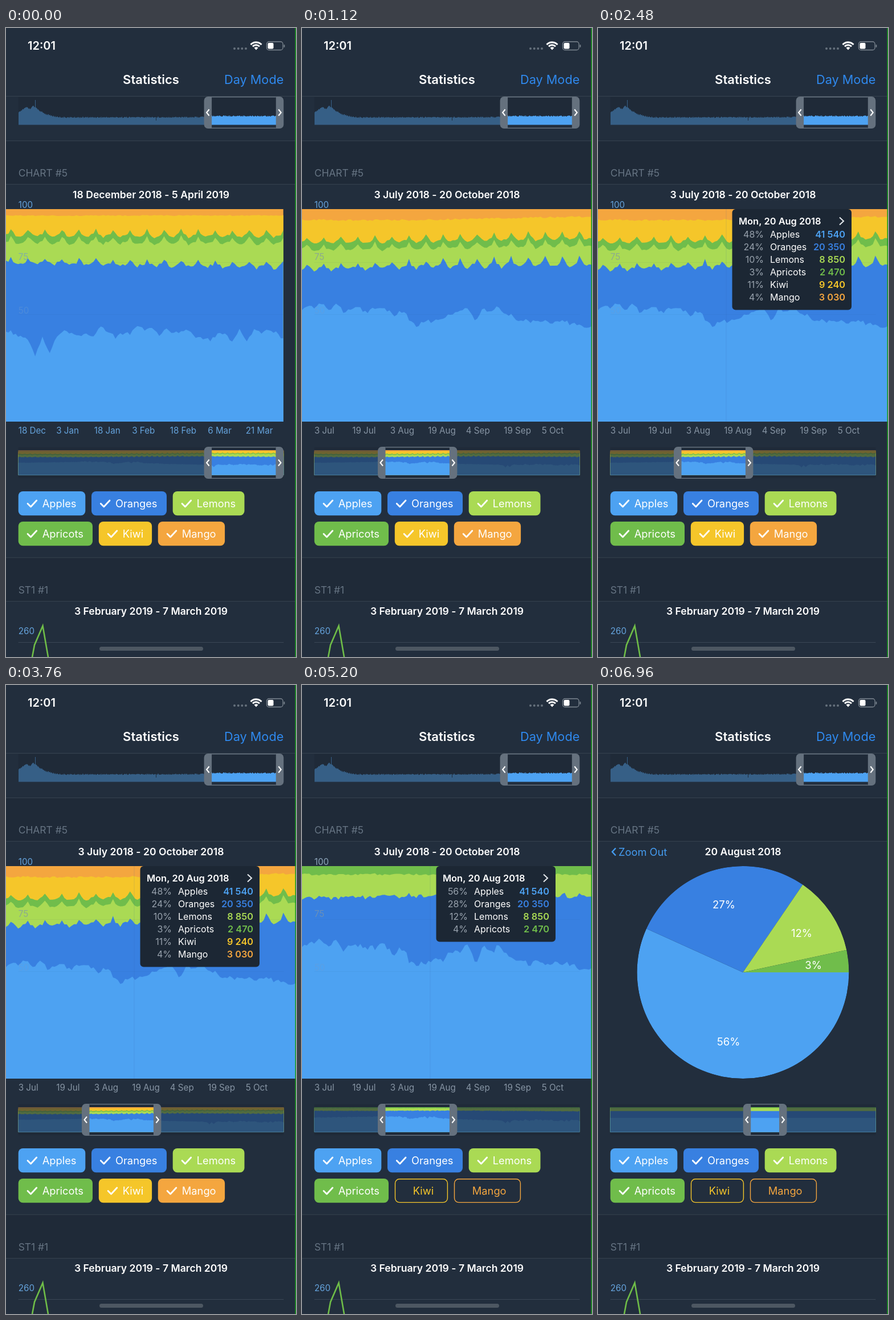
Animation, 509 px wide and 1101 px high, one loop 8000 ms. Source, as an HTML page with a canvas:

```html
<!DOCTYPE html>
<html lang="en">
<head>
<meta charset="utf-8">
<title>Statistics</title>
<style>
html, body { margin: 0; width: 100%; height: 100%; overflow: hidden; background: #222e3d; }
canvas { display: block; width: 509px; height: 1101px; }
</style>
</head>
<body>
<canvas id="stage"></canvas>
<script>
const W = 509, H = 1101, LOOP = 8000, STEP = 80;
const LEFT = 21.7, RIGHT = 487.3, TOP = 317, BOTTOM = 689, DAY_W = 4.27, LAST_DAY = 365;
const CELL = '#222e3d', SECTION = '#1f2a38', DARK = '#1c2734', RULE = '#36424f', MUTED = '#8795a4';
const LINK = '#2f89ee', AXIS = '#65a3dc';
const PIE = { x: 254.5, y: 503, r: 186 };

const series = [
  { name: 'Apples',   color: '#4da2f2', value: 41540, x: 21.7,  y: 811, w: 117.6 },
  { name: 'Oranges',  color: '#3880e1', value: 20350, x: 150,   y: 811, w: 132 },
  { name: 'Lemons',   color: '#aada54', value: 8850,  x: 292.7, y: 811, w: 125.8 },
  { name: 'Apricots', color: '#70bd4b', value: 2470,  x: 21.7,  y: 864, w: 130.3 },
  { name: 'Kiwi',     color: '#f5c62a', value: 9240,  x: 162.8, y: 864, w: 93.3 },
  { name: 'Mango',    color: '#f4a63f', value: 3030,  x: 266.8, y: 864, w: 117.3 }
];
const percents = { 6: [48, 24, 10, 3, 11, 4], 5: [50, 25, 10, 3, 12], 4: [56, 28, 12, 4] };
const pieLabels = [['56%', 229, 624], ['27%', 221, 384], ['12%', 357.5, 434], ['3%', 378, 490]];

const canvas = document.getElementById('stage');
const c = canvas.getContext('2d');
const dpr = window.devicePixelRatio || 1;
canvas.width = Math.round(W * dpr);
canvas.height = Math.round(H * dpr);

const lerp = (a, b, p) => a + (b - a) * p;
const clamp = (v, a, b) => Math.min(b, Math.max(a, v));
const smooth = p => p * p * (3 - 2 * p);
const noise = n => { const v = Math.sin(n * 12.9898) * 43758.5453; return v - Math.floor(v) - 0.5; };

function track(points, d) {
  const i = clamp(points.findIndex(p => p[0] >= d), 1, points.length - 1);
  const [a, b] = [points[i - 1], points[i]];
  return lerp(a[1], b[1], clamp((d - a[0]) / (b[0] - a[0]), 0, 1));
}

// Daily shares, built from layer tops measured on the full chart
const summer = [495, 486, 488, 482, 494, 484, 498, 492, 487, 500, 492, 490, 493, 503, 495, 512, 523, 513, 514, 511,
  502, 498, 494, 494, 512, 490, 497, 488, 500, 505, 512, 512, 513, 513, 518, 513, 514, 517, 518, 525, 523];
const winter = [533, 533, 540, 545, 571, 544, 568, 540, 529, 534, 541, 536, 541, 521, 531, 540, 534, 534, 520, 528,
  524, 538, 529, 531, 532, 528, 540, 543, 545, 534, 533, 549, 529, 547, 528, 532, 530, 531, 546];
const appleTops = [[0, 505], ...summer.map((y, i) => [83.6 + 3 * i, y]), ...winter.map((y, i) => [251 + 3 * i, y])];
const orangeTops = [[0, 424], [84, 424], [203, 416], [251, 413], [365, 421]];
const apricotTops = [[0, 378], [84, 378], [203, 371], [251, 365], [365, 367]];
const kiwiTops = [[0, 337], [84, 336], [130, 336], [203, 330], [251, 328.5], [365, 328]];
const week = [1, 0.5, 0.2, 0, 0.12, 0.25, 0.45];

function makeDay(d) {
  const winterDay = d > 230;
  const beat = week[((d - 163 + (winterDay ? 1 : 0)) % 7 + 7) % 7];
  const grow = clamp((d - 84) / 90, 0, 1);
  const apples = track(appleTops, d) + (d % 3 ? noise(d) * 8 : 0);
  const oranges = track(orangeTops, d) - beat * (winterDay ? 12 : lerp(11, 17, grow)) + noise(d + 400) * 6;
  const apricots = track(apricotTops, d) - beat * (winterDay ? 13 : lerp(10, 15, grow)) + noise(d + 800) * 4;
  const lemons = apricots + 12.5 + noise(d + 1200) * 3;
  const kiwi = track(kiwiTops, d) + noise(d + 1600) * (winterDay ? 1.6 : 3);
  const edges = [BOTTOM, apples, oranges, lemons, apricots, kiwi, TOP];
  return series.map((s, i) => (edges[i] - edges[i + 1]) / (BOTTOM - TOP));
}
const days = Array.from({ length: LAST_DAY + 1 }, (_, d) => makeDay(d));
const pieTotal = series.slice(0, 4).reduce((sum, s) => sum + s.value, 0);
const pieShares = series.map((s, i) => i < 4 ? s.value / pieTotal : 0);

// Progress of a change in 80 ms steps; "lead" is what the first step already shows
function change(t, start, lead) {
  if (t < start) return 0;
  const k = Math.min(3, Math.floor((t - start) / STEP));
  return lerp(lead, 1, k / 3);
}

function text(str, x, y, size, color, weight = 400, align = 'left') {
  c.font = `${weight} ${size}px Inter, Roboto, sans-serif`;
  c.fillStyle = color;
  c.textAlign = align;
  c.fillText(str, x, y);
}
function box(x, y, w, h, color) { c.fillStyle = color; c.fillRect(x, y, w, h); }
function roundPath(x, y, w, h, r) { c.beginPath(); c.roundRect(x, y, w, h, r); }
function roundBox(x, y, w, h, r, color) { roundPath(x, y, w, h, r); c.fillStyle = color; c.fill(); }
function line(points, color, width) {
  c.beginPath();
  points.forEach(p => c.lineTo(p[0], p[1]));
  c.strokeStyle = color;
  c.lineWidth = width;
  c.stroke();
}
function chevron(x, y, w, h, color, width) {
  line([[x, y - h / 2], [x + w, y], [x, y + h / 2]], color, width);
}
function fade(alpha, draw) {
  if (alpha <= 0) return;
  c.save();
  c.globalAlpha *= alpha;
  draw();
  c.restore();
}

function stack(rows, weights, xOf, top, height) {
  const sums = rows.map(r => r.reduce((sum, v, i) => sum + v * weights[i], 0));
  for (let layer = series.length - 1; layer >= 0; layer--) {
    if (!weights[layer]) continue;
    c.beginPath();
    c.moveTo(xOf(0), top + height);
    rows.forEach((row, d) => {
      let v = 0;
      for (let i = 0; i <= layer; i++) v += row[i] * weights[i];
      c.lineTo(xOf(d), top + height * (1 - v / sums[d]));
    });
    c.lineTo(xOf(rows.length - 1), top + height);
    c.fillStyle = series[layer].color;
    c.fill();
  }
}

function dateParts(d) {
  const date = new Date(Date.UTC(2018, 3, 5 + d));
  const month = ['January', 'February', 'March', 'April', 'May', 'June', 'July', 'August',
    'September', 'October', 'November', 'December'][date.getUTCMonth()];
  return [date.getUTCDate(), month, date.getUTCFullYear()];
}
const longDate = d => dateParts(d).join(' ');
const shortDate = d => { const p = dateParts(d); return p[0] + ' ' + p[1].slice(0, 3); };

function selector(x0, x1, y) {
  const grip = 13.5, color = '#65717e';
  line([[x0 + grip, y + 0.7], [x1 - grip, y + 0.7]], color, 1.4);
  line([[x0 + grip, y + 55.3], [x1 - grip, y + 55.3]], color, 1.4);
  roundBox(x0, y, grip, 56, [7, 0, 0, 7], color);
  roundBox(x1 - grip, y, grip, 56, [0, 7, 7, 0], color);
  chevron(x0 + 9, y + 28, -4.5, 11, '#fff', 2);
  chevron(x1 - 9, y + 28, 4.5, 11, '#fff', 2);
}

function statusBar() {
  text('12:01', 38, 38, 20, '#fff', 600);
  [401, 407.7, 414.3, 421].forEach(x => roundBox(x - 2, 34, 4, 4, 2, '#66717d'));
  c.lineCap = 'butt';
  [[13, 3], [8.2, 3]].forEach(([r, w]) => {
    c.beginPath();
    c.arc(439, 38, r, -Math.PI * 0.76, -Math.PI * 0.24);
    c.strokeStyle = '#fff';
    c.lineWidth = w;
    c.stroke();
  });
  c.beginPath();
  c.moveTo(439, 38.5);
  c.arc(439, 38, 4.8, -Math.PI * 0.76, -Math.PI * 0.24);
  c.fillStyle = '#fff';
  c.fill();
  roundPath(457.5, 24, 28.5, 14.5, 4);
  c.strokeStyle = '#7d8791';
  c.lineWidth = 1.3;
  c.stroke();
  roundBox(459.5, 26, 10, 10.5, 2, '#fff');
  roundBox(487.5, 29, 1.8, 5, 1, '#7d8791');
}

function upperNav() {
  box(LEFT, 121, RIGHT - LEFT, 48, SECTION);
  const shape = [[22, 148], [30, 142], [36, 138.5], [42, 142], [46, 136], [50, 139], [54, 141], [60, 146],
    [70, 151], [85, 155], [100, 156.5], [340, 156], [361, 154], [487, 154]];
  for (let x = 22; x < 487; x++) {
    const y = x === 51 ? 126 : x === 263 ? 162 : track(shape, x) + noise(x + 50) * 2;
    box(x, y, 1.05, 169.5 - y, x < 355 ? '#365f86' : series[0].color);
  }
  selector(347.6, RIGHT, 120);
}

function page() {
  box(0, 0, W, H, CELL);
  box(0, 198, W, 76, SECTION);
  box(0, 927, W, 77, SECTION);
  [119, 197, 273, 926.5, 1003].forEach(y => box(0, y, W, 1, RULE));
  statusBar();
  text('Statistics', 254.5, 97.5, 22, '#fff', 600, 'center');
  text('Day Mode', RIGHT, 97.5, 21.7, LINK, 400, 'right');
  upperNav();
  text('CHART #5', LEFT, 260, 17.4, '#667483');
  text('ST1 #1', LEFT, 990, 17.4, '#667483');
  text('3 February 2019 - 7 March 2019', 254.5, 1027, 17.6, '#fff', 600, 'center');
  text('260', LEFT, 1061, 15.2, AXIS);
  box(LEFT, 1075, RIGHT - LEFT, 1, '#3b4756');
  line([[45.5, 1104], [50, 1080], [64.5, 1046.5], [74.5, 1104]], '#6fbd48', 2.6);
  roundBox(164, 1083, 182, 7, 3.5, '#4d5762');
}

function pieWedges(radius) {
  let from = 0;
  pieShares.slice(0, 4).forEach((share, i) => {
    const to = from + share * Math.PI * 2;
    c.beginPath();
    c.moveTo(PIE.x, PIE.y);
    c.arc(PIE.x, PIE.y, radius, from, to);
    c.fillStyle = series[i].color;
    c.fill();
    from = to;
  });
}

function chart(s) {
  const xOf = d => LEFT + (d - s.start) * DAY_W;
  const flat = 1 - s.pie;
  c.save();
  roundPath(lerp(0, PIE.x - PIE.r, s.pie), TOP, lerp(W, PIE.r * 2, s.pie), BOTTOM - TOP, PIE.r * s.pie);
  c.clip();
  fade(flat, () => stack(days, s.weights, xOf, TOP, BOTTOM - TOP));
  fade(s.pie, () => pieWedges(s.pie < 1 ? 420 : PIE.r));
  c.restore();

  fade(flat, () => {
    [410, 501].forEach(y => box(LEFT, y, RIGHT - LEFT, 1, 'rgba(35,60,100,.06)'));
    text('100', LEFT, 314.5, 15.2, s.weights[5] ? AXIS : '#8fa6bb');
    fade(0.7, () => text('75', LEFT, 406, 15.2, s.pan < 1 ? '#6f9fc4' : '#7f96a8'));
    fade(0.4, () => text('50', LEFT, 500, 15.2, '#6d9bd0'));
    for (let i = 0; i < 7; i++) {
      const d = Math.round(s.labelStart + i * 15.58);
      text(shortDate(d), LEFT + i * 66.5, 710, 15.2, s.pan < 1 ? AXIS : MUTED);
    }
  });
}

function heading(s) {
  if (s.zoomed) {
    chevron(31, 292, -6, 13, '#459cf0', 2.4);
    text('Zoom Out', 36, 298.5, 18.3, '#459cf0');
    text('20 August 2018', 254.5, 297.5, 17.6, '#fff', 600, 'center');
  } else {
    const end = Math.min(LAST_DAY, Math.round(s.labelStart + 108.6));
    text(longDate(Math.round(s.labelStart)) + ' - ' + longDate(end), 254.5, 297.5, 17.6, '#fff', 600, 'center');
  }
}

function tooltip(s) {
  fade(s.tip * (1 - s.pie), () => {
    box(224.5, TOP, 1, BOTTOM - TOP, 'rgba(60,100,160,.15)');
    const rows = percents[s.rows];
    roundBox(235.5, TOP, 209.5, 44.5 + 22 * (4 + s.weights[4] + s.weights[5]), 6, DARK);
    text('Mon, 20 Aug 2018', 247, 344, 16.4, '#fff', 600);
    chevron(424, 338, 7, 13, '#e4e8ec', 2);
    rows.forEach((pct, i) => {
      const y = 366.5 + 22 * i;
      const value = String(series[i].value).replace(/(\d{3})$/, ' $1');
      text(pct + '%', 291, y, 16, '#98a2ad', 400, 'right');
      text(series[i].name, 302, y, 16, '#fff');
      text(value, 434, y, 16.3, series[i].color, 600, 'right');
    });
  });
}

function lowerNav(s) {
  const top = 739, height = 43.5, span = RIGHT - LEFT;
  const x0 = s.zoomed ? 254.7 : lerp(347.6, 133, s.pan);
  const x1 = s.zoomed ? 331.5 : x0 + 139.4;
  box(LEFT, 734, span, 54, SECTION);
  stack(days, s.weights, d => LEFT + d * span / LAST_DAY, top, height);
  fade(s.pie, () => stack([pieShares, pieShares], s.weights, d => LEFT + d * span, top, height));
  c.globalAlpha = 0.62;
  box(LEFT, top, x0 + 7 - LEFT, height, DARK);
  box(x1 - 7, top, Math.max(0, RIGHT - x1 + 7), height, DARK);
  c.globalAlpha = 1;
  selector(x0, x1, 733);
}

function button(item, on) {
  const { x, y, w, color, name } = item;
  if (on < 1) {
    roundPath(x + 0.7, y + 0.7, w - 1.4, 40.9, 7.5);
    c.strokeStyle = color;
    c.lineWidth = 1.4;
    c.stroke();
  }
  fade(on, () => {
    roundBox(x, y, w, 42.3, 8, color);
    c.lineCap = c.lineJoin = 'round';
    line([[x + 16.3, y + 21.5], [x + 21.8, y + 27], [x + 32, y + 16]], '#fff', 2.8);
    c.lineCap = 'butt';
    c.lineJoin = 'miter';
  });
  text(name, x + lerp(32, 42, on), y + 27.5, 18.3, on > 0.5 ? '#fff' : color);
}

function stateAt(t) {
  const pan = smooth(change(t, 880, 0.25));
  const mango = 1 - smooth(change(t, 3760, 0));
  const kiwi = 1 - smooth(change(t, 4960, 0));
  return {
    pan,
    start: lerp(256.1, 89.1, pan),
    labelStart: lerp(256.95, 89.2, pan),
    tip: change(t, 2240, 0.15),
    weights: [1, 1, 1, 1, kiwi, mango],
    rows: kiwi < 1 ? 4 : mango < 1 ? 5 : 6,
    zoomed: t >= 6720,
    pie: smooth(change(t, 6720, 0))
  };
}

function frame(now) {
  const s = stateAt(now % LOOP);
  c.setTransform(dpr, 0, 0, dpr, 0, 0);
  page();
  chart(s);
  heading(s);
  tooltip(s);
  if (s.zoomed) pieLabels.forEach(([str, x, y]) => text(str, x, y + 6.5, 18.5, '#fff', 400, 'center'));
  lowerNav(s);
  series.forEach((item, i) => button(item, s.weights[i]));
  box(507.5, 0, 1.5, H, '#1a9a1f');
}

const origin = performance.now();
function tick() {
  frame(performance.now() - origin);
  requestAnimationFrame(tick);
}
tick();
</script>
</body>
</html>
```
